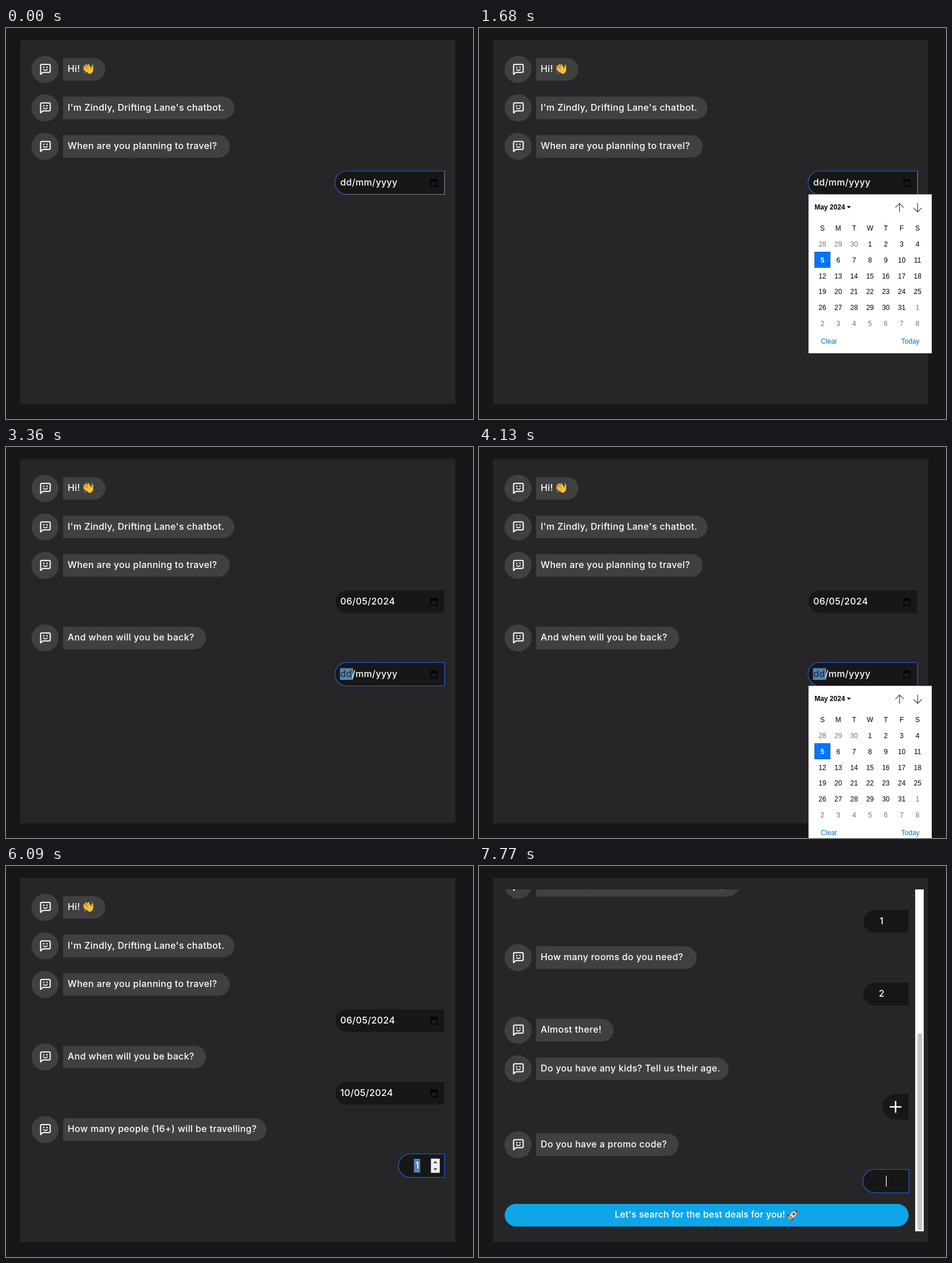
An HTML page that plays this animation: 818 px wide and 685 px high, repeating every 8 s.

```html
<!DOCTYPE html>
<html lang="en">
<head>
<meta charset="utf-8">
<title>Travel chatbot</title>
<style>
  html, body { margin: 0; width: 100%; height: 100%; overflow: hidden; background: #171717; }
  svg { display: block; width: 100%; height: 100%; }
  .chat { font: 500 16px Inter, Roboto, sans-serif; letter-spacing: .35px; fill: #fff; }
  .chat .action { letter-spacing: .1px; }
  .cal { font: 12px "Liberation Sans", Arial, sans-serif; fill: #000; text-anchor: middle; }
  .cal .bold { font-weight: 700; }
  .cal .out { fill: #737373; }
  .cal .link { fill: #0073bd; }
</style>
</head>
<body>
<svg id="stage" viewBox="0 0 818 685">
  <defs>
    <clipPath id="view"><rect x="25" y="41" width="762" height="599"/></clipPath>
    <g id="bot">
      <circle r="23.8" fill="#404040"/>
      <g fill="none" stroke="#fff" stroke-width="2" stroke-linejoin="round" stroke-linecap="round">
        <path d="M-7.8 8.8V-6.7a2 2 0 0 1 2-2H7a2 2 0 0 1 2 2V3.2a2 2 0 0 1-2 2H-3.8z"/>
        <path d="M-2.8-.2Q.6 3.6 4-.2" stroke-width="1.6"/>
      </g>
      <circle cx="-2.2" cy="-3.7" r="1.3" fill="#fff"/>
      <circle cx="3.4" cy="-3.7" r="1.3" fill="#fff"/>
    </g>
    <g id="dateIcon" fill="#000">
      <path d="M-5.3-4.6H5.3V6.2H-5.3z" fill="none" stroke="#000" stroke-width="1.5"/>
      <path d="M-6-5.3H6V-1.8H-6zM-4.2-7.2h1.8v2.4h-1.8zM2.4-7.2h1.8v2.4H2.4z"/>
    </g>
    <g id="wave" fill="none" stroke="#fcc436" stroke-linecap="round">
      <path d="M-4.5 4L-9-.5M-3 1.5L-8.5-4.5M-.5-.5L-5.6-7M2-1.5L-1.5-7.3" stroke-width="2.7"/>
      <path d="M5.5 3Q6.2-1 5.6-4.6" stroke-width="2.9"/>
      <circle cx="1.3" cy="3.2" r="4.6" fill="#fcc436" stroke-width="1"/>
      <path d="M-4.2 1.6L-1 4.6M-2-.4L1 2.6" stroke="#d99320" stroke-width=".7"/>
      <path d="M3.4-9Q6.5-8.6 7.6-6M-9.2 4.2Q-8.4 7.2-5.8 8" stroke="#8c9aa3" stroke-width="1"/>
    </g>
    <g id="rocket" transform="rotate(45)">
      <path d="M-2.6 6Q0 16 2.6 6z" fill="#ffb02e"/>
      <path d="M-3 0L-6.6 5.5V9L-2.4 6.5zM3 0L6.6 5.5V9L2.4 6.5z" fill="#c8322c"/>
      <path d="M0-12.5Q5-7 4 1.5L2.6 7H-2.6L-4 1.5Q-5-7 0-12.5z" fill="#d3d8de"/>
      <path d="M0-12.5Q2.6-9.5 3.4-6.8H-3.4Q-2.6-9.5 0-12.5z" fill="#c8322c"/>
      <circle cy="-2.5" r="2" fill="#2d4254"/>
      <path d="M0 2v6" stroke="#8b2420" stroke-width="1.4"/>
    </g>
  </defs>
  <rect width="818" height="685" fill="#171717"/>
  <rect x="25" y="21" width="762" height="638" fill="#262628"/>
  <g clip-path="url(#view)"><g id="log" class="chat"></g></g>
  <g id="bar"></g>
  <g id="picker" class="cal"></g>
</svg>
<script>
const LOOP = 8000, BLUE = '#2160dc';
const $ = id => document.getElementById(id);
const use = (id, x, y) => `<g transform="translate(${x} ${y})"><use href="#${id}"/></g>`;
const text = (x, y, s, attr = '') => `<text x="${x}" y="${y}" ${attr}>${s}</text>`;
const rect = (x, y, w, h, attr) => `<rect x="${x}" y="${y}" width="${w}" height="${h}" ${attr}/>`;

// Bot bubble: square on the left, round on the right
function say(y, right, s) {
  const r = 19.8;
  return use('bot', 68.4, y) +
    `<path d="M100 ${y - r}H${right - r}a${r} ${r} 0 0 1 0 ${2 * r}H100z" fill="#404040"/>` +
    text(108, y + 4.6, s);
}

// Answer field: round on the left, square on the right
function field(y, left, right, focus, h = 39.6, grey = false) {
  const r = h / 2;
  let out = `<path d="M${right} ${y - r}H${left + r}a${r} ${r} 0 0 0 0 ${h}H${right}z" fill="#171717"/>`;
  if (!focus) return out;
  const R = r + .7, x = left + r, top = y - R, low = y + R;
  const line = (d, c) => `<path d="${d}" fill="none" stroke="${c}" stroke-width="1.1"/>`;
  out += line(`M${x} ${low}H${right + .7}V${top}`, grey ? '#7d8694' : BLUE);
  return out + line(`M${right + .7} ${top}H${x}A${R} ${R} 0 0 0 ${x} ${low}`, BLUE);
}

function dateField(y, dx, value, focus, marked) {
  const x = 585.5 - dx;
  let out = field(y, 577 - dx, 767.5 - dx, focus, 39.6, !marked);
  if (marked && !value) out += rect(x - .5, y - 10.5, 23, 20.5, 'fill="#5484b4"');
  const blank = marked ? '<tspan fill="#1b2c40">dd</tspan>/mm/yyyy' : 'dd/mm/yyyy';
  return out + text(x, y + 4.6, value || blank) + use('dateIcon', 749.5 - dx, y);
}

function numberField(y, dx, value, focus, marked, hover) {
  const mid = 720 - dx, x = 744.3 - dx;
  let out = field(y, 688 - dx, 767.5 - dx, focus);
  if (marked) out += rect(mid - 5.5, y - 12, 11, 24, 'fill="#5484b4"');
  out += text(mid + .3, y + 4.6, value, 'text-anchor="middle"');
  if (!focus) return out;
  out += rect(x, y - 12.3, 15.5, 24.8, 'fill="#efefef"');
  if (hover) out += rect(x + .7, y, 14, 12, 'fill="#c4c4c4"');
  const c = x + 7.7;
  return out + `<path d="M${c - 3.7} ${y - 4.3}h7.4l-3.7-4zM${c - 3.7} ${y + 4.5}h7.4l-3.7 4z" fill="#505050"/>`;
}

function lastPart(dx) {
  const right = 767.5 - dx;
  return say(715.5, 235.5, 'Almost there!') +
    say(783.3, 437, 'Do you have any kids? Tell us their age.') +
    field(850, 707, right, false, 45) +
    '<path d="M719.5 850h20.4M729.7 839.8v20.4" stroke="#fff" stroke-width="2.6"/>' +
    say(916.3, 349.5, 'Do you have a promo code?') +
    field(980, 673, right, true) +
    '<path d="M713.4 970.5v19" stroke="#fff" stroke-width="1.2"/>' +
    rect(45, 1020, right - 45, 39.4, 'rx="19.7" fill="#0ea5e9"') +
    text(387, 1044, "Let's search for the best deals for you!", 'class="action" text-anchor="middle"') +
    use('rocket', 549.5, 1039.5);
}

function drawLog(t) {
  const long = t >= 6580, dx = long ? 15 : 0;
  let out = say(72.5, 174, 'Hi!') + use('wave', 145.5, 72) +
    say(140, 400, "I'm Zindly, Drifting Lane's chatbot.") +
    say(207.5, 392, 'When are you planning to travel?') +
    dateField(271, dx, t >= 3290 && '06/05/2024', t < 3360, false);
  if (t >= 3360) out += say(334.5, 350.5, 'And when will you be back?') +
    dateField(398, dx, t >= 5600 && '10/05/2024', t < 5670, true);
  if (t >= 5670) out += say(461.7, 456, 'How many people (16+) will be travelling?') +
    numberField(525, dx, 1, !long, !long, t >= 5880 && t < 6090);
  if (long) out += say(588.5, 381.5, 'How many rooms do you need?') +
    numberField(652.2, dx, t < 7630 ? 0 : 2, t < 7700, t < 7630);
  if (t >= 7700) out += lastPart(dx);
  const scroll = t < 6650 ? 0 : t < 7770 ? 33 : 428;
  $('log').innerHTML = `<g transform="translate(0 ${-scroll})">${out}</g>`;
  $('bar').innerHTML = long ? scrollbar(scroll, t < 7700 ? 640 : 1027) : '';
}

function scrollbar(pos, total) {
  const top = 41, view = 599;
  return rect(764, top, 15, view, 'fill="#fff"') +
    rect(768, top + pos / total * view + 2, 8.4, view * view / total - 4, 'rx="4.2" fill="#c6c6c6"');
}

// Month sheet for May 2024; cells are addressed by the day of the month
function calendar(dy, picked, hover, arrowHover) {
  const pitch = 27.78, x0 = 587.6, y0 = 364.4;
  let out = rect(576.8, 291, 216.6, 279.2, 'fill="#fff" stroke="#0c0c0c" stroke-width=".8"');
  if (arrowHover) out += rect(723.5, 302, 26.5, 24, 'fill="#b3d6ff"');
  out += text(587.7, 318, 'May 2024', 'class="bold" style="text-anchor:start"') +
    '<path d="M644.3 312h7l-3.5 4z"/>' +
    '<path d="M736.6 322.7V307.4M729.4 314.6l7.2-7.2 7.2 7.2M768.3 307v15.3M761.1 315.1l7.2 7.2 7.2-7.2" fill="none" stroke="#4a4a4a" stroke-width="1.3"/>';
  [...'SMTWTFS'].forEach((d, i) => out += text(x0 + (i + .5) * pitch, 354.5, d));
  for (let i = 0; i < 42; i++) {
    const n = i - 2, x = x0 + i % 7 * pitch, y = y0 + Math.floor(i / 7) * pitch;
    const box = attr => rect(x + .4, y + .4, pitch - .8, pitch - .8, attr);
    let style = n < 1 || n > 31 ? 'class="out"' : '';
    if (n === picked) {
      out += box('fill="#0075ff" stroke="#0a55b4"');
      style = 'class="bold" style="fill:#fff"';
    } else if (n === hover) out += box('fill="#b3d6ff"');
    else if (n === 5) out += box('fill="none" stroke="#6b6b6b"');
    out += text(x + pitch / 2, y + 18.6, n < 1 ? n + 30 : n > 31 ? n - 31 : n, style);
  }
  out += text(613, 553, 'Clear', 'class="link"') + text(755.6, 553, 'Today', 'class="link"');
  return `<g transform="translate(0 ${dy})">${out}</g>`;
}

// Day under the pointer, as [from time, day]
const HOVER = [[2240, 1], [2310, 7], [2520, 6], [3290, 0], [4480, 24], [4690, 18], [4900, 17], [5110, 10]];

function drawPicker(t) {
  const hit = HOVER.filter(h => t >= h[0]).pop();
  const hover = hit && hit[1] || null;
  let out = '';
  if (t >= 1680 && t < 3290) out = calendar(0, t < 3220 ? 5 : 6, hover, t >= 2030 && t < 2100);
  if (t >= 4130 && t < 5600) out = calendar(127, t < 5530 ? 5 : 10, hover, false);
  $('picker').innerHTML = out;
}

// Everything changes on a 70 ms clock, so redraw once per tick
let shown = -1;
function draw(t) {
  const tick = Math.floor(t / 70);
  if (tick === shown) return;
  shown = tick;
  drawLog(tick * 70);
  drawPicker(tick * 70);
}

const start = performance.now();
function frame() {
  draw((performance.now() - start) % LOOP);
  requestAnimationFrame(frame);
}
frame();
</script>
</body>
</html>
```
